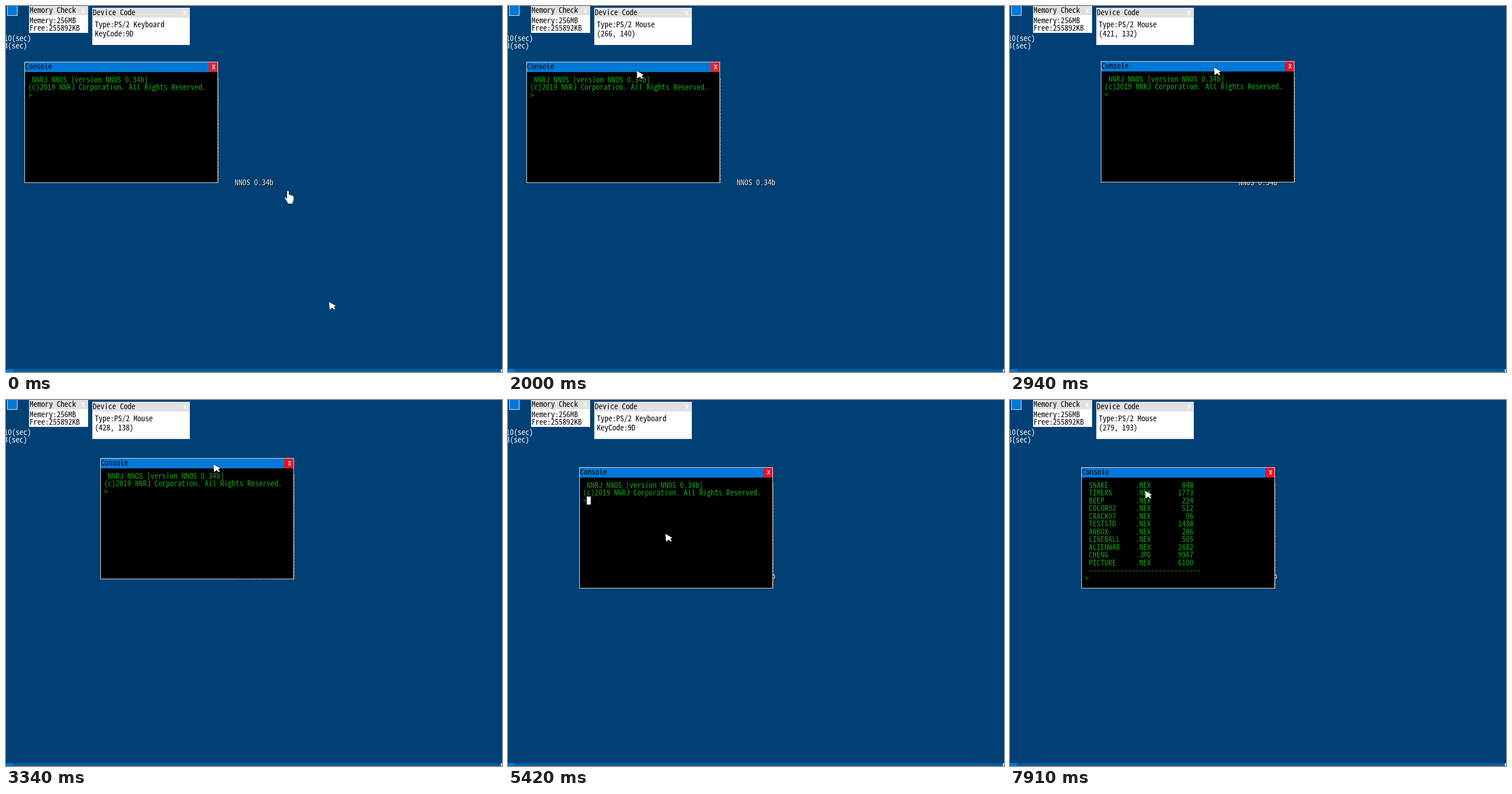
An HTML page with a canvas for the animation above (7.99 s loop, 863 by 637 pixels).

```html
<!DOCTYPE html>
<html lang="en">
<head>
<meta charset="utf-8">
<title>Desktop console</title>
<style>
html, body { margin: 0; width: 100%; height: 100%; overflow: hidden; background: #004074; }
canvas { display: block; }
</style>
</head>
<body>
<canvas id="stage" width="863" height="637"></canvas>
<script>
const ctx = document.getElementById('stage').getContext('2d');
const LOOP = 7990;
const TICK = 78;                     // time between pointer updates
const BLINK = 504, BLINK_START = 330;
const DRAG_START = 2380, DRAG_END = 3660;
const SCALE = 863 / 1024;            // desktop units to stage pixels
const CELL = 8 * SCALE, ROW = 16 * SCALE;
const BLUE = '#0078d7', GREEN = '#12a812';
const FACE = '"Noto Sans Mono CJK JP", "Noto Sans Mono CJK SC", "Noto Sans Mono", monospace';

// Pick the size whose advance is exactly one cell.
ctx.font = `100px ${FACE}`;
const FONT = `${100 * CELL / ctx.measureText('M').width}px ${FACE}`;

// Key points of the pointer: time, x, y in desktop units
const PATH = [
  [460, 667, 617], [1300, 514, 451], [2000, 266, 140], [2190, 256, 129],
  [DRAG_START, 272, 134], [2940, 421, 132], [3130, 547, 153], [3340, 428, 138],
  [DRAG_END, 381, 157], [3800, 381, 157], [4180, 325, 282],
  [7310, 325, 282], [7390, 319, 276], [7600, 319, 276], [7910, 279, 193]
];
// The hand, in stage pixels
const HAND = [[0, 484, 321], [70, 476, 312], [285, 510, 359]];
const KEYS = [[0, '9D'], [4410, '1D'], [4490, '9D'], [6120, '26'],
  [6200, '1F'], [6350, '1C'], [6520, '9C']];

const FILES = ['SNAKE 848', 'TIMERS 1773', 'BEEP 224', 'COLOR02 512', 'CRACK07 96',
  'TESTSTD 1438', 'ANBOX 286', 'LINEBALL 505', 'ALIENWAR 2682', 'CHENG 9967', 'PICTURE 6100'];
const LISTING = FILES.map(file => {
  const [name, size] = file.split(' ');
  return ' ' + name.padEnd(12) + (name === 'CHENG' ? '.JPG' : '.NEX') + size.padStart(11);
}).concat(' ' + '-'.repeat(29), '>');
const BANNER = [' NNRJ NNOS [version NNOS 0.34b]',
  '(c)2019 NNRJ Corporation. All Rights Reserved.'];

// Straight moves between key points, in whole ticks
function along(path, t) {
  const next = path.findIndex(k => k[0] > t);
  if (next === 0) return path[0].slice(1);
  if (next < 0) return path[path.length - 1].slice(1);
  const [a, ax, ay] = path[next - 1], [b, bx, by] = path[next];
  const n = Math.max(1, Math.round((b - a) / TICK));
  const u = Math.floor((t - a) / (b - a) * n) / n;
  return [Math.round(ax + (bx - ax) * u), Math.round(ay + (by - ay) * u)];
}

const pointer = t => along(PATH, t);
const toStage = ([x, y]) => [Math.round(x * SCALE), Math.round(y * SCALE - 4.5)];

function rect(x, y, w, h, color) {
  ctx.fillStyle = color;
  ctx.fillRect(x, y, w, h);
}

function text(str, x, y, color) {
  ctx.fillStyle = color;
  ctx.fillText(str, x, y);
}

function edges(x, y, w, h, color) {
  ctx.strokeStyle = color;
  ctx.lineWidth = 1;
  ctx.strokeRect(x + .5, y + .5, w - 1, h - 1);
}

function panel(x, y, w, h, title) {
  rect(x, y, w, h, '#fff');
  rect(x, y, w, 17, '#e1e1e1');
  edges(x, y, w, h, '#d8d8d8');
  text(title, x + 1, y + 13, '#000');
  text('x', x + w - 12, y + 13, '#fff');
}

function deviceLines(t) {
  const usesMouse = (t >= 530 && t < 4330) || t >= 7390;
  if (usesMouse) return ['Type:PS/2 Mouse', `(${pointer(t).join(', ')})`];
  const code = KEYS.filter(k => k[0] <= t).pop()[1];
  return ['Type:PS/2 Keyboard', 'KeyCode:' + code];
}

function desktop(t) {
  rect(0, 0, 863, 637, '#004074');
  rect(0, 632, 863, 5, '#005a9e');
  rect(0, 632, 12, 5, BLUE);
  rect(861, 632, 2, 5, '#e1e1e1');
  rect(2, -1, 18, 18, BLUE);
  edges(2, -1, 18, 18, '#e8e8e8');
  text('10(sec)', -3.5, 60.5, '#fff');
  text('3(sec)', -3.5, 74, '#fff');
  text('NNOS 0.34b', 399, 313, '#000');
  text('NNOS 0.34b', 398, 312, '#f4f4f4');

  panel(40, -1, 103, 48, 'Memory Check');
  text('Memery:256MB', 41, 29.5, '#000');
  text('Free:255892KB', 41, 43, '#000');

  panel(150, 3, 170, 65, 'Device Code');
  deviceLines(t).forEach((line, i) => text(line, 154.5, 36.5 + i * 16.5, '#000'));
}

function consoleLines(t) {
  if (t >= 6350) return LISTING;
  return [...BANNER, t >= 6200 ? '>ls' : t >= 6120 ? '>l' : '>'];
}

function consoleWindow(t) {
  const grab = Math.min(Math.max(t, DRAG_START), DRAG_END);
  const [px, py] = toStage(pointer(grab));
  const x = px - 197, y = py - 11;
  rect(x, y, 337, 211, '#000');
  rect(x + 1, y + 1, 335, 17, BLUE);
  rect(x + 320, y + 1, 16, 17, t < DRAG_START ? '#d42a35' : '#e81123');
  edges(x, y, 337, 211, '#dcdcdc');

  // broken shadow line on the right
  ctx.setLineDash([2, 1, 1, 2]);
  ctx.strokeStyle = '#a8a8a0';
  ctx.beginPath();
  ctx.moveTo(x + 337.5, y + 29);
  ctx.lineTo(x + 337.5, y + 211);
  ctx.stroke();
  ctx.setLineDash([]);

  text('Console', x + 1, y + 12.5, '#000');
  text('x', x + 326, y + 13, '#fff');
  const lines = consoleLines(t);
  const left = x + 6.6, top = y + 24.5;
  lines.forEach((line, i) => text(line, left, top + 11.5 + i * ROW, GREEN));

  const blink = Math.floor((t - BLINK_START) / BLINK);
  if (blink >= 0 && blink % 2 === 0) {
    const column = lines[lines.length - 1].length;
    rect(Math.round(left + column * CELL), Math.round(top + (lines.length - 1) * ROW), 7, 14, '#fff');
  }
}

function outlined(path, x, y) {
  ctx.save();
  ctx.translate(x, y);
  ctx.fillStyle = '#fff';
  ctx.strokeStyle = '#000';
  ctx.lineWidth = 1;
  ctx.stroke(path);
  ctx.fill(path);
  ctx.restore();
}

const ARROW = new Path2D('M0 0L12 7 8 8.5 11 12 9 13.5 5.5 10 1 13.5Z');
const POINTING = new Path2D('M5 2Q6.5 -.5 8 2V8Q10 6.5 11 8.5 13 7.5 14 9.5 16 9 16.5 11V16' +
  'Q16.5 19 14.5 20.5V23H6V20.5L1 14Q.5 11.5 3 12.5L5 14.5Z');

function draw(t) {
  ctx.font = FONT;
  desktop(t);
  consoleWindow(t);
  outlined(ARROW, ...toStage(pointer(t)));
  if (t < 530) outlined(POINTING, ...along(HAND, t));
}

const start = performance.now();
function tick() {
  draw((performance.now() - start) % LOOP);
  requestAnimationFrame(tick);
}
tick();
</script>
</body>
</html>
```
